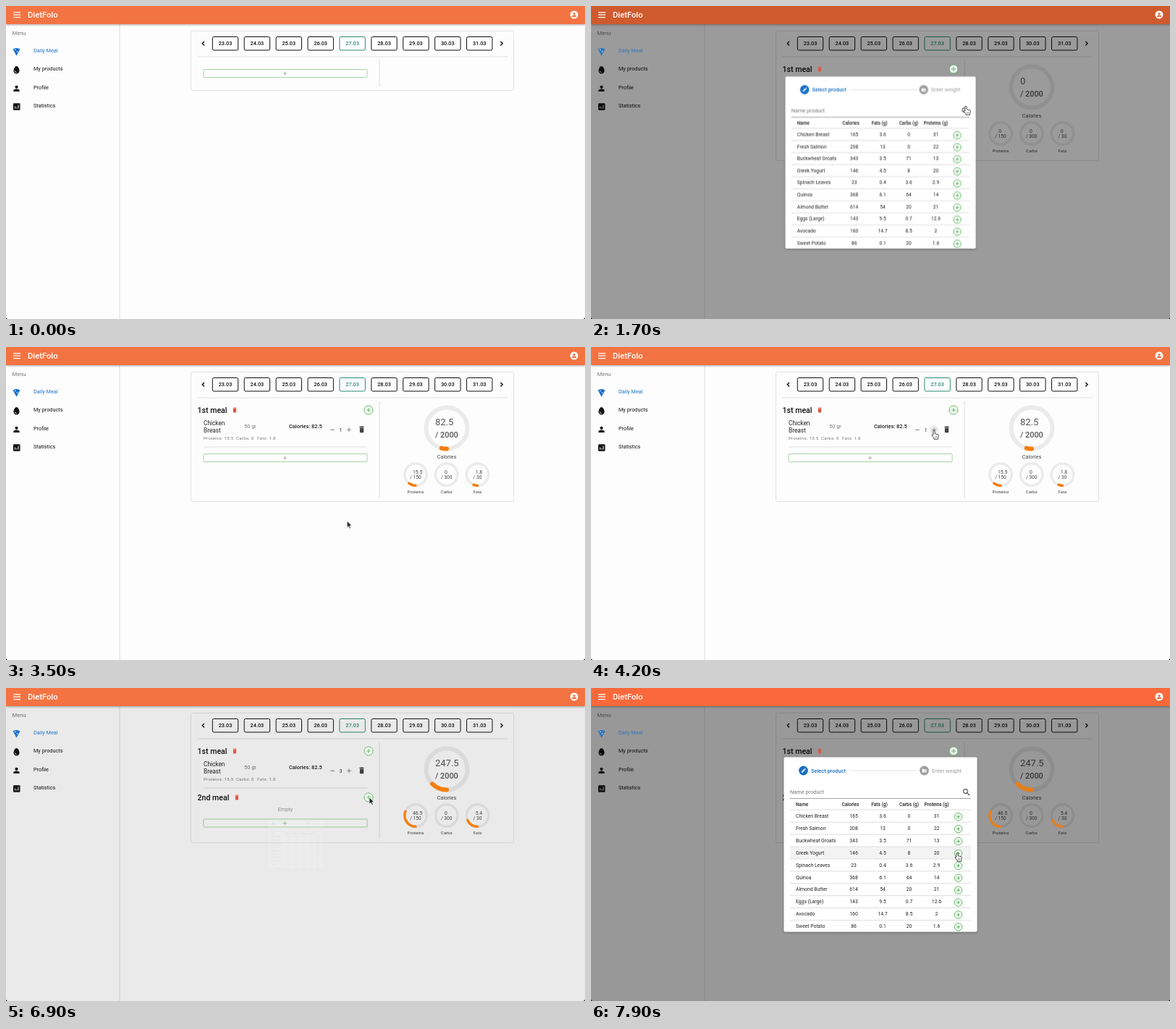
Write an HTML page that moves like this. It is 800x432 px and loops after 8 s.

```html
<!DOCTYPE html>
<html lang="en">
<head>
<meta charset="utf-8">
<title>Meal planner</title>
<style>
html, body { margin: 0; width: 100%; height: 100%; overflow: hidden; background: #fdfdfd; }
svg { display: block; width: 800px; height: 432px; font-family: Roboto, sans-serif; }
.b { font-weight: 500; }
.c { text-anchor: middle; }
.anim, [data-show] { animation: 8s linear infinite; }
[data-show] { animation-timing-function: step-end; }
.dialog { transform-origin: 400px 216px; }
.shade { animation-name: shade; }
.accent { animation-name: accent; }
.bar { animation-name: bar; }
.pick { animation-name: pick; }
.weigh { animation-name: weigh; }
.arc { animation-name: arc; }
.cursor { animation-name: cursor; animation-timing-function: ease-in-out; }

@keyframes shade {
  0%, 18.125% { opacity: 0; } 18.75% { opacity: .18; } 20% { opacity: .7; }
  21.25% { opacity: .97; } 21.875%, 40.625% { opacity: 1; } 43.125%, 85.625% { opacity: 0; }
  86.25% { opacity: .18; } 87.5% { opacity: .7; } 88.75% { opacity: .97; } 89.375%, 100% { opacity: 1; }
}
@keyframes accent {
  0%, 18.125% { opacity: 1; } 21.25%, 40.625% { opacity: .85; }
  43.125%, 85.625% { opacity: 1; } 88.75%, 100% { opacity: .85; }
}
@keyframes bar {
  0%, 18.125% { fill: #f47343; } 21.25% { fill: #cf5a2d; } 22.5%, 40.625% { fill: #fa693a; }
  43.125%, 86.25% { fill: #f47343; } 88.75% { fill: #cf5a2d; } 90%, 100% { fill: #fa693a; }
}
@keyframes pick {
  0%, 18.125% { opacity: 0; transform: scale(.2); }
  18.75% { opacity: .12; transform: scale(.28); }
  20% { opacity: .7; transform: scale(.8); }
  21.25% { opacity: 1; transform: scale(.985); }
  21.875%, 31.249% { opacity: 1; transform: none; }
  31.25% { opacity: 0; transform: none; }
  31.26%, 85.625% { opacity: 0; transform: scale(.2); }
  86.25% { opacity: .12; transform: scale(.28); }
  87.5% { opacity: .7; transform: scale(.8); }
  88.75% { opacity: 1; transform: scale(.985); }
  89.375%, 100% { opacity: 1; transform: none; }
}
@keyframes weigh {
  0%, 31.249% { opacity: 0; transform: none; }
  31.25%, 40.625% { opacity: 1; transform: none; }
  42.5%, 100% { opacity: 0; transform: scale(.4); }
}
@keyframes arc {
  0%, 40.625% { stroke-dasharray: 0px 200px; }
  43.125%, 53.75% { stroke-dasharray: calc(var(--v) * 1px) 200px; }
  57%, 60% { stroke-dasharray: calc(var(--v) * 2px) 200px; }
  63.25%, 100% { stroke-dasharray: calc(var(--v) * 3px) 200px; }
}
@keyframes cursor {
  0%, 1% { transform: translate(440px, 185px); }
  6.25%, 8.75% { transform: translate(387px, 92px); }
  15%, 18.5% { transform: translate(500px, 84px); }
  21.25% { transform: translate(518px, 138px); }
  26.25%, 31.5% { transform: translate(507px, 177px); }
  36.25% { transform: translate(481px, 236px); }
  38.75%, 42% { transform: translate(471px, 254px); }
  50%, 64% { transform: translate(474px, 115px); }
  72.5%, 76.25% { transform: translate(387px, 152px); }
  82.5%, 88.5% { transform: translate(502px, 151px); }
  95%, 100% { transform: translate(506px, 227px); }
}
</style>
</head>
<body>
<svg id="stage" viewBox="0 0 800 432"></svg>
<script>
const text = (x, y, size, str, fill = '#222', cls = '', extra = '') =>
  `<text x="${x}" y="${y}" font-size="${size}" fill="${fill}" class="${cls}" ${extra}>${str}</text>`;
const path = (d, stroke, w = 1, extra = '') =>
  `<path d="${d}" fill="none" stroke="${stroke}" stroke-width="${w}" ${extra}/>`;
const shape = (d, fill) => `<path d="${d}" fill="${fill}"/>`;
const box = (x, y, w, h, r, fill, stroke = 'none', extra = '') =>
  `<rect x="${x}" y="${y}" width="${w}" height="${h}" rx="${r}" fill="${fill}" stroke="${stroke}" ${extra}/>`;
const dot = (x, y, r, fill, stroke = 'none', w = 1) =>
  `<circle cx="${x}" cy="${y}" r="${r}" fill="${fill}" stroke="${stroke}" stroke-width="${w}"/>`;
const at = (x, y, body, scale = 1) => `<g transform="translate(${x} ${y}) scale(${scale})">${body}</g>`;
const show = (from, to, body) => `<g data-show="${from} ${to}">${body}</g>`;
const plus = (x, y, r, color, w = .9) => path(`M${x - r} ${y}h${2 * r}M${x} ${y - r}v${2 * r}`, color, w);
const addCircle = (x, y, r) => dot(x, y, r, '#fbfefb', '#4caf50', .9) + plus(x, y, r / 2, '#4caf50');
const trash = (x, y, fill, s = 1) =>
  at(x, y, shape('M-2.7-3.6h1.6l.5-.6h1.2l.5 .6h1.6v.9h-5.4zM-2.3-2.2h4.6v5.3q0 .7-.7 .7h-3.2q-.7 0-.7-.7z', fill), s);
const person = (x, y, fill, s = 1) =>
  at(x, y, dot(0, -2.2, 2.1, fill) + shape('M-4.2 4v-1.2c0-3 8.4-3 8.4 0v1.2z', fill), s);
const BLUE = '#1b70c5', GREY = '#777', LINE = '#dedede';

function nav() {
  const items = ['My products', 'Profile', 'Statistics'];
  return text(8.5, 40, 7.6, 'Menu', GREY) +
    items.map((s, i) => text(38, 89.3 + 25.2 * i, 7.3, s, '#111')).join('') +
    shape('M14.5 83c2 0 4 3.600 4 6.300a4 4.300 0 0 1-8 0c0-2.700 2-6.300 4-6.300z', '#111') +
    path('M12.300 89.500q.2 2 2.200 2.200', '#fff', .9) +
    person(14.5, 114, '#111') +
    box(10, 134.300, 9.500, 9.500, 1.200, '#111') +
    path('M12.600 141.500v-3M14.800 141.500v-1.500M17 141.500v-5', '#fff', 1);
}

function dates() {
  let out = path('M274 49l-2.800 2.800 2.800 2.800M683.300 49l2.800 2.800-2.800 2.800', '#111', 1.400);
  for (let i = 0; i < 9; i++) {
    const x = 303 + 43.9 * i, color = i === 4 ? '#2e8b74' : '#111';
    out += box(x - 17.7, 42.5, 35.4, 18.5, 2, 'none', color) +
      text(x, 54.300, 7.300, `${23 + i}.03`, color, 'b c');
  }
  return out;
}

const card = (bottom) => box(255.5, 34.5, 446, bottom - 34, 2, 'none', '#e2e2e2') +
  path(`M264 70h429M516 75V${bottom - 5}`, LINE);
const addBar = (y) => box(273, y - 5.5, 226, 11, 1, '#fdfffd', '#a9d1a6') + plus(385.5, y, 2.7, '#8fae8d', .8);

function mealRow() {
  const stat = (x, s) => text(x, 127.5, 6, s, GREY, '', 'letter-spacing=".33"');
  return text(273, 107.5, 8.300, 'Chicken') + text(273, 117.5, 8.300, 'Breast') +
    text(329, 112, 7.400, '50 gr', GREY) + text(391, 111.600, 7.400, 'Calories: 82.5', '#222', 'b') +
    stat(273, 'Proteins: 15.5') + stat(318, 'Carbs: 0') + stat(347, 'Fats: 1.8') +
    path('M273 138h226', LINE) +
    show(3900, 5300, dot(474, 114, 6, '#ebebeb')) +
    path('M448.300 114.300h5.400', '#777') + plus(474, 114.300, 2.800, '#777') + trash(491.5, 114, '#444', 1.15) +
    show(3250, 4300, text(462.5, 116.700, 7.300, 1, '#333', 'c')) +
    show(4300, 4800, text(462.5, 116.700, 7.300, 2, '#333', 'c')) +
    show(4800, 8000, text(462.5, 116.700, 7.300, 3, '#333', 'c'));
}

const RINGS = [
  { name: 'Calories', x: 609, y: 112, r: 28.5, w: 6, goal: 2000, unit: 82.5 },
  { name: 'Proteins', x: 566, y: 176, r: 15.2, w: 3.4, goal: 150, unit: 15.5 },
  { name: 'Carbs', x: 608.7, y: 176, r: 15.2, w: 3.4, goal: 300, unit: 0 },
  { name: 'Fats', x: 651.5, y: 176, r: 15.2, w: 3.4, goal: 30, unit: 1.8 }
];

function ring({ name, x, y, r, w, goal, unit }) {
  const big = goal === 2000;
  const value = (n) => {
    const s = String(+(unit * n).toFixed(1));
    const left = s === '0' ? x - 2.8 : x - (name === 'Fats' ? 2.8 : 4);
    return big ? text(593, 108, 13, s, '#555') : text(left, 175.200, 6.800, s, '#444');
  };
  const span = [[600, 3250], [3250, 4300], [4300, 4800], [4800, 8000]];
  const target = '/ ' + goal;
  return dot(x, y, r, 'none', '#ebebeb', w) +
    (big ? text(593, 124.700, 10.900, target, '#555', 'b') : text(x, 182, 6.600, target, '#444', 'c')) +
    text(x, big ? 153.600 : 201.800, big ? 7.300 : 6.200, name, '#444', 'c') +
    span.map(([a, b], n) => show(a, b, value(n))).join('');
}

const arc = ({ x, y, r, w, goal, unit }) => unit ? path(
  `M${x} ${y + r}a${r} ${r} 0 1 1 0 ${-2 * r}a${r} ${r} 0 1 1 0 ${2 * r}`, '#f57c0a', w,
  `class="anim arc" pathLength="100" stroke-linecap="round" style="--v:${100 * unit / goal}"`) : '';

const pencil = shape('M-2.700 2.700l.4-1.700 3.300-3.300 1.400 1.400-3.300 3.300zM1.500-2.700l.6-.5 1.300 1.300-.5 .6z', '#fff');
const step = (x, y, icon, label, on) =>
  dot(x, y, 6.400, on ? BLUE : '#9e9e9e') + at(x, y, icon) +
  text(x + 10.500, y + 2.600, 7.400, label, on ? BLUE : '#9e9e9e', on ? 'b' : '');
const folder = shape('M-3-2.300h2.300l.8 .8h2.900v4h-6z', '#fff') + dot(.9, .8, .8, '#9e9e9e');
const check = path('M-2.600 0l1.900 1.900 3.500-3.700', '#fff', 1.200);

const FOODS = `Chicken Breast,165,3.6,0,31
Fresh Salmon,208,13,0,22
Buckwheat Groats,343,3.5,71,13
Greek Yogurt,146,4.5,8,20
Spinach Leaves,23,0.4,3.6,2.9
Quinoa,368,6.1,64,14
Almond Butter,614,54,20,21
Eggs (Large),143,9.5,0.7,12.6
Avocado,160,14.7,8.5,2
Sweet Potato,86,0.1,20,1.6`.split('\n').map(s => s.split(','));
const COLS = [283, 363, 403, 439.5, 477.5];

function pickDialog() {
  const heads = ['Name', 'Calories', 'Fats (g)', 'Carbs (g)', 'Proteins (g)'];
  const headX = [283, 358.5, 398.5, 439.5, 477.5];
  const hover = (i) => box(275, 168.500 + 16.9 * i, 250, 16.500, 0, '#f3f3f3');
  const rows = FOODS.map((food, i) => {
    const y = 176.700 + 16.9 * i;
    return food.map((s, c) => text(COLS[c], y + 2.300, 6.800, s, '#222', c ? 'c' : '')).join('') +
      (i < 9 ? path(`M275 ${y + 8.500}h250`, LINE) : '') + addCircle(507.5, y + 1, 5.200);
  }).join('');
  return box(266.5, 95.5, 267, 241, 2, '#fff', 'none', 'filter="url(#lift)"') +
    step(293.5, 114, pencil, 'Select product', true) + path('M358 114h93', '#ddd', .8) +
    step(460.5, 114, folder, 'Enter weight', false) +
    text(275, 146, 7.400, 'Name product', GREY) +
    `<circle cx="517.5" cy="142.500" r="2.900" fill="none" stroke="#555" stroke-width="1.100"/>` +
    path('M519.700 144.700l3.300 3.300', '#555', 1.400) + path('M275 152.500h250', '#8a8a8a', .8) +
    heads.map((s, i) => text(headX[i], 163, 6.500, s, '#222', i ? 'b c' : 'b')).join('') +
    path('M275 168h250', LINE) + show(2050, 2500, hover(0)) + show(7550, 8000, hover(3)) + rows;
}

const weighDialog = () =>
  box(305, 162.5, 190, 107, 2, '#fff', 'none', 'filter="url(#lift)"') +
  step(332.5, 181.3, check, 'Select product', true) + path('M396 181.300h15', '#ccc', .8) +
  step(422, 181.3, pencil, 'Enter weight', true) +
  text(313.5, 212.300, 10.700, 'Chicken Breast', '#111', 'b') +
  text(313.5, 225, 5.500, 'Change weight', GREY) + text(313.5, 233, 7.400, '50') +
  path('M313.500 237.500h174', '#8a8a8a', .8) +
  box(455, 246.5, 31.500, 18.500, 2, '#4caf50', 'none', 'filter="url(#lift)"') +
  text(470.7, 258.300, 7.200, 'ADD', '#fff', 'b c');

const hand = `<path d="M-1.200 1q1.200-1.600 2.300 0v3.700l4.200 .9q1.200 .4 1 1.700l-.8 3.200v1.700h-5.500v-1.200l-3-4q-.3-1.400 1.800-.3z"
  fill="#fff" stroke="#222" stroke-width=".8" stroke-linejoin="round"/>` + path('M1.800 8v2.600M3.400 8v2.600', '#222', .5);
const arrow = `<path d="M0 0v9.200l2.100-2 1.500 3.400 1.500-.7-1.500-3.300h2.900z" fill="#222" stroke="#fff" stroke-width=".6"/>`;
const beam = path('M-1.800-4q1.800 0 1.800 1v6q0 1-1.800 1M1.800-4q-1.800 0-1.800 1v6q0 1 1.800 1', '#222', .8);

const spans = (body, list) => list.map(([a, b]) => show(a, b, body)).join('');
const heading = (s, y) => text(264.5, y + 4, 10.600, s, '#111', 'b');
const empty = (y) => text(386, y + 2.500, 7.400, 'Empty', '#999', 'c');

document.getElementById('stage').innerHTML = `
<defs><filter id="lift" x="-10%" y="-10%" width="120%" height="125%">
  <feDropShadow dx="0" dy="1" stdDeviation="1.5" flood-opacity=".35"/></filter></defs>
${box(0, 0, 800, 432, 0, '#fdfdfd')}
${path('M157 25V432', LINE)}${nav()}${dates()}
${show(0, 600, card(116) + addBar(93))}
${show(600, 8000, card(213) + heading('1st meal', 87) + RINGS.map(ring).join(''))}
${show(600, 3250, empty(103.5) + addBar(123))}
${show(3250, 8000, mealRow())}
${show(3250, 6000, addBar(153))}
${show(6000, 8000, heading('2nd meal', 151) + empty(167.5) + addBar(186.5))}
<rect class="anim shade" y="25" width="800" height="407" fill="#000" fill-opacity=".4"/>
<rect class="anim bar" width="800" height="25" filter="url(#lift)"/>
${path('M10 8.800h10M10 12.200h10M10 15.600h10', '#fff', 1.200)}
${text(30, 16, 11.2, 'DietFolo', '#fff', 'b')}
${dot(785, 12, 5.5, '#fff')}${person(785, 12, '#f06c3c', .72)}
<g class="anim accent">
  ${text(38, 64.200, 7.300, 'Daily Meal', BLUE)}
  ${shape('M9.500 59.500q5-3 10 0l-5 9.300z', BLUE)}${dot(12.8, 60.5, .8, '#fff')}${dot(15.5, 63, .8, '#fff')}
  ${show(600, 8000, trash(316, 87, '#e0523f', .9) + addCircle(501, 87, 6))}
  ${show(6000, 8000, trash(319, 151, '#e0523f', .9) + addCircle(501, 151, 6))}
  ${show(3250, 8000, RINGS.map(arc).join(''))}
</g>
<g class="anim dialog pick">${pickDialog()}</g>
<g class="anim dialog weigh">${weighDialog()}</g>
${shape('M0 430l2 2h-2zM800 430l-2 2h2z', '#222')}
<g class="anim cursor">
  ${spans(arrow, [[100, 450], [750, 1150], [1850, 2050], [2550, 2800], [3350, 3900], [5200, 5700], [6250, 6550], [6850, 7400]])}
  ${spans(hand, [[450, 750], [1150, 1850], [2050, 2550], [3000, 3350], [3900, 5200], [5700, 6250], [6550, 6850], [7400, 8000]])}
  ${show(2800, 3000, beam)}
</g>`;

// One stepped visibility rule per distinct time span.
const rules = new Set();
document.querySelectorAll('[data-show]').forEach(el => {
  const [from, to] = el.dataset.show.split(' ').map(Number);
  const name = `show-${from}-${to}`;
  el.style.animationName = name;
  rules.add(`@keyframes ${name} { ${from ? '0% { opacity: 0 }' : ''} ${from / 80}% { opacity: 1 }
    ${to / 80}% { opacity: ${to < 8000 ? 0 : 1} } 100% { opacity: ${to < 8000 ? 0 : 1} } }`);
});
document.head.appendChild(document.createElement('style')).textContent = [...rules].join('\n');
</script>
</body>
</html>
```
